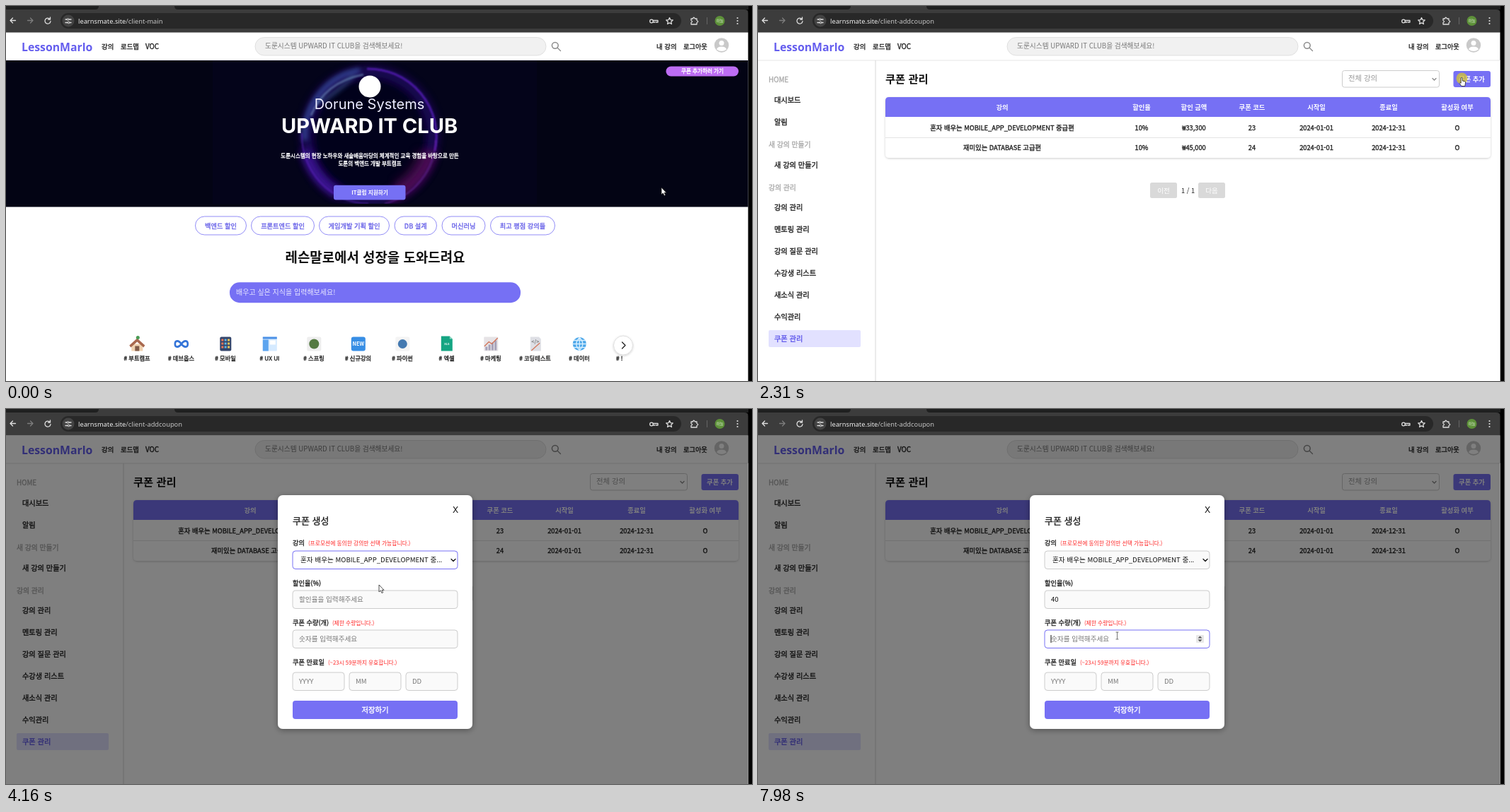
An HTML page for the animation above (8000 ms loop, 1054x531 px).

```html
<!DOCTYPE html>
<html lang="ko">
<head>
<meta charset="utf-8">
<style>
html, body { margin: 0; width: 100%; height: 100%; overflow: hidden; background: #000 }
svg { display: block }
text { font-family: 'Noto Sans CJK KR', 'Noto Sans CJK', 'Noto Sans', sans-serif; white-space: pre }
text[font-weight="500"] { font-weight: 400; stroke-width: .35px }
.brand, .url { font-family: 'Noto Sans', sans-serif }
.inter { font-family: Inter, 'Noto Sans CJK KR', sans-serif }
.line { fill: none; stroke-width: 1.3; stroke-linecap: round; stroke-linejoin: round }
</style>
</head>
<body>
<svg id="stage" width="1054" height="531" viewBox="0 0 1054 531"></svg>
<script>
const PURPLE = '#7670f4', DARK = '#222', WIDTH = 1048.5, TOP = 37.5;
const $ = id => document.getElementById(id);

// Medium weight is regular type with a hairline outline of its own colour.
const text = (x, y, s, size, fill = DARK, weight = 400, anchor = 'start', cls = '') =>
  `<text x="${x}" y="${y}" font-size="${size}" fill="${fill}" font-weight="${weight}" text-anchor="${anchor}" class="${cls}"${weight === 500 ? ` stroke="${fill}"` : ''}>${s}</text>`;
const mid = (x, y, s, size, fill, weight, cls) => text(x, y, s, size, fill, weight, 'middle', cls);
const rect = (x, y, w, h, fill, r = 0, extra = '') =>
  `<rect x="${x}" y="${y}" width="${w}" height="${h}" rx="${r}" fill="${fill}" ${extra}/>`;
const circle = (x, y, r, fill, extra = '') => `<circle cx="${x}" cy="${y}" r="${r}" fill="${fill}" ${extra}/>`;
const line = (d, color, extra = '') => `<path class="line" d="${d}" stroke="${color}" ${extra}/>`;
const shape = (d, fill, extra = '') => `<path d="${d}" fill="${fill}" ${extra}/>`;
const group = (id, body, extra = '') => `<g id="${id}" ${extra}>${body}</g>`;

const browser = () =>
  rect(0, 0, WIDTH, 38, '#3c3c3c') + rect(0, 0, WIDTH, 5, '#1f2020') +
  shape('M126 5Q131 5 131 0H238Q238 5 243 5Z', '#3c3c3c') +
  shape('M1043 5H1049V10Q1049 5 1043 5Z', '#000') +
  rect(77, 10, 877, 22, '#282828', 11) +
  line('M13.500 20.500H6M9.500 17L6 20.500L9.500 24', '#ddd') +
  line('M30.500 20.500H38M34.500 17L38 20.500L34.500 24', '#7c7c7c') +
  line('M62 18.500A4 4 0 1 0 63 21.500M62.500 16V19H59.500', '#ddd') +
  circle(88, 21, 8.5, '#434343') +
  line('M84 19H86M89 19H92M84 23.500H87M90 23.500H92', '#ddd') +
  circle(87.5, 19, 1.3, 'none', 'stroke="#ddd"') + circle(88.5, 23.5, 1.3, 'none', 'stroke="#ddd"') +
  ['main', 'addcoupon'].map((p, i) => group('url' + i,
    `<text class="url" x="102" y="24.500" font-size="9.300" fill="#eee">learnsmate.site<tspan fill="#c4c4c4">/client-${p}</tspan></text>`)).join('') +
  circle(912, 21.5, 2.3, 'none', 'stroke="#ddd" stroke-width="1.300"') +
  line('M914.500 20.500H921V23H918.500M914.500 23H917', '#ddd') +
  line('M937.500 16.500L938.900 19.600L942.200 20L939.800 22.300L940.400 25.500L937.500 23.900L934.600 25.500L935.200 22.300L932.800 20L936.100 19.600Z', '#ddd') +
  line('M968 18H970.500Q971.500 14.500 973.500 18H976V20.500Q979.500 22 976 23.500V26H968V23.500Q971 22 968 20.500Z', '#ddd') +
  rect(990, 16, 1, 10, '#666') + circle(1008.5, 21, 7, '#5d9139') + mid(1008.5, 23, '하늘', 5.5, '#e4f0dc') +
  [17, 21, 25].map(y => circle(1033.5, y, 1.1, '#ddd')).join('');

const header = () =>
  rect(0, TOP, WIDTH, 494, '#fff') +
  text(22, 63.5, 'LessonMarlo', 15.8, '#655eee', 700, 'start', 'brand') +
  text(135, 61, '강의', 9.4, DARK, 500) + text(162, 61, '로드맵', 9.4, DARK, 500) + text(197, 61, 'VOC', 9.8, DARK, 500) +
  rect(352, 44.5, 411, 25.5, '#f1f1f1', 12.7, 'stroke="#dadada" stroke-width=".8"') +
  text(366, 60, '도룬시스템 UPWARD IT CLUB을 검색해보세요!', 9.7, '#777') +
  circle(775.8, 55.8, 4.4, 'none', 'stroke="#8b8b8b" stroke-width="1.500"') + line('M779.200 59.200L783.500 63.500', '#8b8b8b', 'stroke-width="1.800"') +
  text(919, 61, '내 강의', 9.4, DARK, 500) + text(957, 61, '로그아웃', 9.2, DARK, 500) +
  circle(1011, 55.5, 10.2, '#c9c9c9') + circle(1011, 52.5, 3.5, '#fff') + shape('M1004 61.500Q1005 57.500 1011 57.500T1018 61.500Q1011 66.500 1004 61.500Z', '#fff');

const arc = (d, color, width, blur, opacity = 1) =>
  `<path d="${d}" fill="none" stroke="${color}" stroke-width="${width}" opacity="${opacity}" filter="url(#blur${blur})"/>`;

const banner = () =>
  rect(0, 77, WIDTH, 207.5, '#030414') +
  `<g clip-path="url(#photo)">` + rect(292, 77, 458, 203, '#04041a') +
  `<ellipse cx="514" cy="184" rx="90" ry="92" fill="#05051a" stroke="#2c0f80" stroke-width="14" opacity=".6" filter="url(#blur6)"/>` +
  arc('M422 190A93 95 0 0 1 500 91', '#3f5cb4', 8, 3, .6) +
  arc('M431 155Q450 108 505 97', '#7f9dcc', 3, 1, .5) +
  arc('M440 138Q465 125 492 98', '#4a7aa8', 6, 3, .45) +
  arc('M510 89A96 96 0 0 1 606 205', '#5a1fbe', 3, 1, .8) +
  arc('M423 205A92 94 0 0 0 470 266', '#4c17b0', 13, 6, .8) +
  arc('M418 180A96 97 0 0 0 512 280', '#5f24c4', 2, 1, .6) +
  arc('M601 205A90 92 0 0 1 540 270', '#5c1157', 17, 6, .8) +
  arc('M588 205A78 80 0 0 1 550 255', '#4c0f42', 14, 6, .5) +
  arc('M607 190A95 96 0 0 1 535 280', '#6a20a4', 2, 1, .6) + '</g>' +
  circle(514, 114, 15.5, '#fff') +
  mid(513.5, 145.5, 'Dorune Systems', 20, '#eef', 400, 'inter') +
  mid(513.5, 179.5, 'UPWARD IT CLUB', 29, '#fff', 700, 'inter') +
  mid(514, 215, '도룬시스템의 현장 노하우와 새솔배움마당의 체계적인 교육 경험을 바탕으로 만든', 7.5, '#fff', 500) +
  mid(514, 226, '도룬의 백엔드 개발 부트캠프', 7.5, '#fff', 500) +
  rect(463, 253.7, 101.5, 20.8, PURPLE, 3) + mid(514, 267, 'IT클럽 지원하기', 7.6, '#fff', 700) +
  rect(932.5, 85.5, 102.5, 14, '#bd6df3', 7) + mid(984, 95, '쿠폰 추가하러 가기', 7.6, '#fff', 500);

// Category icons, each drawn around its own centre.
const icons = [
  ['부트캠프', shape('M-8 0H8V10H-8Z', '#f0d2b0') + shape('M0 -8L11 2L9 5L0 -3L-9 5L-11 2Z', '#a9694f') + rect(-3, 3, 6, 7, '#815b48') + circle(1, -9, 2.5, '#4a9c55')],
  ['데브옵스', `<path d="M0 0C-4 -6 -9 -5 -9 0S-4 6 0 0S9 -5 9 0S4 6 0 0Z" fill="none" stroke="#3474d8" stroke-width="2.600"/>`],
  ['모바일', rect(-8, -10, 16, 20, '#34456b', 2) + [0, 1, 2, 3, 4, 5, 6, 7, 8].map(i => rect(-6 + i % 3 * 4.4, -7 + (i / 3 | 0) * 5, 3, 3, ['#ee7756', '#5eb6e5', '#e9c65a'][i % 3])).join('')],
  ['UX UI', rect(-10, -10, 20, 20, '#d5eaff', 1) + rect(-10, -10, 20, 3, '#4c91e6') + rect(-10, -6, 8, 16, '#5ca4ef') + rect(0, -5, 8, 6, '#fff')],
  ['스프링', rect(-10, -10, 20, 20, '#eee', 2) + circle(0, 0, 7, '#557a43')],
  ['신규강의', rect(-10, -10, 20, 20, '#378ee5', 3) + mid(0, 2.8, 'NEW', 7.2, '#fff', 700)],
  ['파이썬', rect(-10, -10, 20, 20, '#f4f4f4', 2) + circle(0, 0, 6.5, '#4479b0')],
  ['엑셀', shape('M-8 -11H4L8 -7V10H-8Z', '#15a583') + shape('M4 -11V-7H8Z', '#8ad8c2') + mid(0, 1.5, 'XLS', 4, '#fff', 700)],
  ['마케팅', rect(-10, -10, 20, 20, '#e6e3e6', 1) + [0, 1, 2, 3].map(i => rect(-8 + i * 4.3, 4 - i * 3, 3, 5 + i * 3, '#a7a3ba')).join('') + line('M-9 3L-3 -3L1 0L9 -8', '#d27357')],
  ['코딩테스트', shape('M-7 -10H5L8 -7V10H-7Z', '#dedfe5') + mid(0, -1, '&lt;/&gt;', 7, '#777', 700) + line('M-5 9L6 -1', '#d3785b', 'stroke-width="3"')],
  ['데이터', circle(0, 0, 9.5, '#4aa6e9') + line('M-9 0H9M0 -9V9M-8 -5H8M-8 5H8M0 -9Q-9 0 0 9Q9 0 0 -9', '#d9f0ff', 'stroke-width="1"')]
];

const chips = [[267.5, 72, '백엔드 할인'], [346.5, 89, '프론트엔드 할인'], [442.5, 99, '게임개발 기획 할인'], [549, 59.5, 'DB 설계'], [616, 61, '머신러닝'], [684.5, 91, '최고 평점 강의들']];

const home = () => banner() +
  chips.map(([x, w, s]) => rect(x, 298, w, 26, '#fff', 13, `stroke="${PURPLE}" stroke-width=".8"`) + mid(x + w / 2, 314.5, s, 9.2, '#6862e8', 500)).join('') +
  mid(521.5, 363, '레슨말로에서 성장을 도와드려요', 18.9, '#111', 700) +
  rect(316, 391.3, 411, 28.9, PURPLE, 14) + text(325, 409, '배우고 싶은 지식을 입력해보세요!', 10, '#e9e8ff') +
  icons.map(([s, art], i) => `<g transform="translate(${185.3 + i * 62.5} 478.500)">${art}</g>` +
    mid(185 + i * 62.5, 502, '# ' + s, 8.2, DARK, 500)).join('') +
  text(862, 502, '# !', 8.2, DARK, 500) +
  circle(872, 480.5, 13.5, '#fff', 'stroke="#ddd" filter="url(#shadow)"') + line('M870.500 476L875 480.500L870.500 485', '#222');

const menu = [['HOME', 108, 1], ['대시보드', 136.5], ['알림', 167.5], ['새 강의 만들기', 200, 1], ['새 강의 만들기', 228.5], ['강의 관리', 260.5, 1],
  ['강의 관리', 289], ['멘토링 관리', 320], ['강의 질문 관리', 351], ['수강생 리스트', 382], ['새소식 관리', 413], ['수익관리', 444]];
const columns = [345, 542, 616, 698, 789, 891, 988];
const row = (y, cells, fill, weight) => cells.map((s, i) => mid(columns[i], y, s, 9.3, fill, weight)).join('');
const pager = (x, s) => rect(x, 250, 38, 22, '#d9d9d9', 2.5) + mid(x + 19, 264.5, s, 9.5, '#fff');

const coupons = () =>
  rect(0, 77, WIDTH, 454, '#fff') + rect(0, 76.5, WIDTH, 1, '#e6e6e6') + rect(165.5, 77, 1, 454, '#d8d8d8') +
  menu.map(([s, y, head]) => text(head ? 15 : 23, y, s, head ? 9.8 : 10.2, head ? '#aaa' : DARK, 500)).join('') +
  rect(15, 459, 130, 24, '#e2e1ff', 2) + text(23, 475, '쿠폰 관리', 10.2, '#5d56ea', 500) +
  text(180, 109, '쿠폰 관리', 15.3, '#111', 700) +
  rect(825.5, 91.5, 137, 23.5, '#fff', 3, 'stroke="#ccc"') + text(834, 106, '전체 강의', 10.4, '#999') +
  line('M953 102.500L955.500 105L958 102.500', '#888') +
  rect(982.5, 92, 52.5, 23, PURPLE, 3) + mid(1008.5, 107.3, '쿠폰 추가', 9.3, '#fff', 700) +
  rect(180, 129, 855, 86, '#fff', 5, 'filter="url(#shadow)"') +
  shape('M180 157V134Q180 129 185 129H1030Q1035 129 1035 134V157Z', PURPLE) +
  row(146.5, ['강의', '할인율', '할인 금액', '쿠폰 코드', '시작일', '종료일', '활성화 여부'], '#fff', 700) +
  group('rows', rect(180, 186, 855, 1, '#e4e4e4') +
    row(175.5, ['혼자 배우는 MOBILE_APP_DEVELOPMENT 중급편', '10%', '₩33,300', '23', '2024-01-01', '2024-12-31', 'O'], DARK, 500) +
    row(204, ['재미있는 DATABASE 고급편', '10%', '₩45,000', '24', '2024-01-01', '2024-12-31', 'O'], DARK, 500)) +
  pager(554, '이전') + mid(607.5, 264.5, '1 / 1', 9.3) + pager(622, '다음');

const field = (id, x, y, w, hint) =>
  rect(x, y, w, 25.5, '#fafafa', 4, `id="${id}" stroke="#ccc"`) +
  text(x + 9, y + 15.6, hint, 9.6, '#777').replace('<text', `<text id="${id}Text"`);
const label = (y, s, x, note = '') => text(405, y, s, 9.2, DARK, 500) + text(x, y, note, 7.75, '#f22');
const spinner = (id, y) => group(id, rect(619, y - 5.5, 11, 11, '#e8e8e8', 1) +
  shape(`M621.500 ${y - 1}L624.500 ${y - 4}L627.500 ${y - 1}ZM621.500 ${y + 1}L624.500 ${y + 4}L627.500 ${y + 1}Z`, '#555'));
const PROMPT = '강의를 선택해주세요', PICK = '혼자 배우는 MOBILE_APP_DEVELOPMENT 중...';

const modal = () =>
  rect(0, TOP, WIDTH, 494, '#000', 0, 'opacity=".5"') +
  rect(384, 122, 275, 331, '#fff', 7, 'filter="url(#deep)"') +
  text(405, 163, '쿠폰 생성', 13, DARK, 500) + mid(635, 147, 'X', 12, '#111', 400, 'inter') +
  label(193, '강의', 427, '(프로모션에 동의한 강의만 선택 가능합니다.)') +
  field('select', 405, 201, 233, PROMPT) + line('M629 212.500L632 215.500L635 212.500', '#111', 'stroke-width="1.600"') +
  label(249.5, '할인율(%)', 0) + field('rate', 405, 257, 233, '') + spinner('rateSpin', 269.5) +
  label(305.5, '쿠폰 수량(개)', 461, '(제한 수량입니다.)') +
  field('count', 405, 313, 233, '숫자를 입력해주세요') + spinner('countSpin', 325.5) +
  label(361.5, '쿠폰 만료일', 455, '(~23시 59분까지 유효합니다.)') +
  ['YYYY', 'MM', 'DD'].map((s, i) => field(s, 405 + i * 80, 373, 73, s)).join('') +
  rect(405, 413, 233, 26, PURPLE, 4) + mid(521.5, 429.5, '저장하기', 10.4, '#fff', 500) +
  rect(0, 264, 1, 11, '#111', 0, 'id="caret"') +
  group('list', rect(405, 227, 233, 70, '#fff', 2, 'stroke="#bbb" filter="url(#shadow)"') +
    rect(406, 0, 231, 22, '#dedede', 0, 'id="hover"') +
    [PROMPT, PICK, '재미있는 DATABASE 고급편'].map((s, i) => text(416, 243.5 + i * 22, s, 9.6)).join(''));

const pointers = () =>
  group('pointer', circle(.5, .5, 8, '#d2c238', 'opacity=".8" id="click"') +
    group('arrow', shape('M0 0V10L2.300 8L4 11.600L5.700 10.800L4.100 7.400H7Z', '#fff', 'stroke="#222" stroke-width=".8"')) +
    group('hand', shape('M-.8 0Q.5 -1.500 1.300 0V4L4.500 4.700Q5.800 5 5.500 7L4.800 11.500H0L-3 7.500Q-2.500 6 -.8 7.200Z', '#fff', 'stroke="#222" stroke-width=".8"')) +
    group('beam', `<path d="M-2 -5H2M0 -5V5M-2 5H2" fill="none" stroke="#555" stroke-width=".8"/>`));

const blurs = [1, 3, 6].map(n => `<filter id="blur${n}" x="-30%" y="-30%" width="160%" height="160%"><feGaussianBlur stdDeviation="${n}"/></filter>`).join('');
$('stage').innerHTML = `<defs>${blurs}
  <clipPath id="photo"><path d="M292 77H750V280H292Z"/></clipPath>
  <filter id="shadow"><feDropShadow dx="0" dy="1" stdDeviation="1.500" flood-opacity=".2"/></filter>
  <filter id="deep"><feDropShadow dx="0" dy="2" stdDeviation="4" flood-opacity=".35"/></filter></defs>` +
  rect(0, 0, 1054, 531, '#000') + browser() + header() + group('home', home()) + group('coupons', coupons()) + group('modal', modal()) + pointers();

// Pointer stops: time, x, y.
const path = [[0, 926, 257], [260, 926, 257], [1050, 977, 101], [1100, 977, 101], [1120, 977, 97], [1980, 977, 97], [2100, 994, 102],
  [2660, 994, 102], [3200, 545, 214], [3500, 545, 214], [3850, 530, 258], [3990, 530, 258], [4150, 527, 249], [4230, 527, 249],
  [5050, 515, 262], [5390, 515, 262], [5500, 519, 261], [5850, 519, 261], [6150, 521.5, 261], [7310, 521.5, 261], [7820, 507.5, 321], [8000, 507.5, 321]];
const STEP = 68;

function pointerAt(t) {
  const i = path.findIndex(p => p[0] > t);
  const [t0, x0, y0] = path[i - 1], [t1, x1, y1] = path[i];
  const u = Math.min(1, (Math.floor((t - t0) / STEP) + 1) * STEP / (t1 - t0));
  const e = u * u * (3 - 2 * u);
  return [x0 + (x1 - x0) * e, y0 + (y1 - y0) * e];
}

const show = (id, on) => $(id).style.display = on ? '' : 'none';
const within = (t, ...spans) => spans.some(([a, b]) => t >= a && t < b);

function draw(t) {
  const [x, y] = pointerAt(t);
  const loaded = t >= 1310;
  show('url0', !loaded);
  show('url1', loaded);
  show('home', !loaded);
  show('coupons', loaded);
  show('rows', t >= 1380);
  show('modal', t >= 2460);

  const overRate = t > 4300 && y > 257 && y < 283, overCount = t > 7310 && y > 313;
  const focus = within(t, [3260, 5120]) ? 'select' : within(t, [5120, 7850]) ? 'rate' : t >= 7850 ? 'count' : '';
  for (const id of ['select', 'rate', 'count']) {
    $(id).setAttribute('stroke', id === focus ? PURPLE : '#ccc');
    $(id).setAttribute('fill', id === focus ? '#fff' : '#fafafa');
  }
  const selectText = $('selectText');
  selectText.textContent = t < 3970 ? PROMPT : PICK;
  selectText.setAttribute('fill', '#111');
  selectText.setAttribute('x', 416);

  const typed = t < 6370 ? '' : t < 6570 ? '4' : '40';
  $('rateText').textContent = typed || '할인율을 입력해주세요';
  $('rateText').setAttribute('fill', typed ? '#111' : '#777');
  show('rateSpin', overRate || focus === 'rate');
  show('countSpin', overCount || focus === 'count');
  show('caret', within(t, [5120, 5450], [5920, 7100], [7600, 8000]));
  $('caret').setAttribute('x', focus === 'count' ? 413.5 : 413.5 + typed.length * 5);
  $('caret').setAttribute('y', focus === 'count' ? 320 : 264);

  show('list', within(t, [3270, 3970]));
  $('hover').setAttribute('y', y > 250 ? 250.5 : 228.5);

  const hand = within(t, [1100, 1310], [2050, 2460]), beam = overRate || overCount;
  show('hand', hand);
  show('beam', beam);
  show('arrow', !hand && !beam);
  show('click', within(t, [1170, 1310], [2310, 2460], [3200, 3340], [3900, 4000], [5060, 5190], [7830, 7930]));
  $('pointer').setAttribute('transform', `translate(${x} ${y})`);
}

const start = performance.now();
(function tick() {
  draw((performance.now() - start) % 8000);
  requestAnimationFrame(tick);
})();
</script>
</body>
</html>
```
